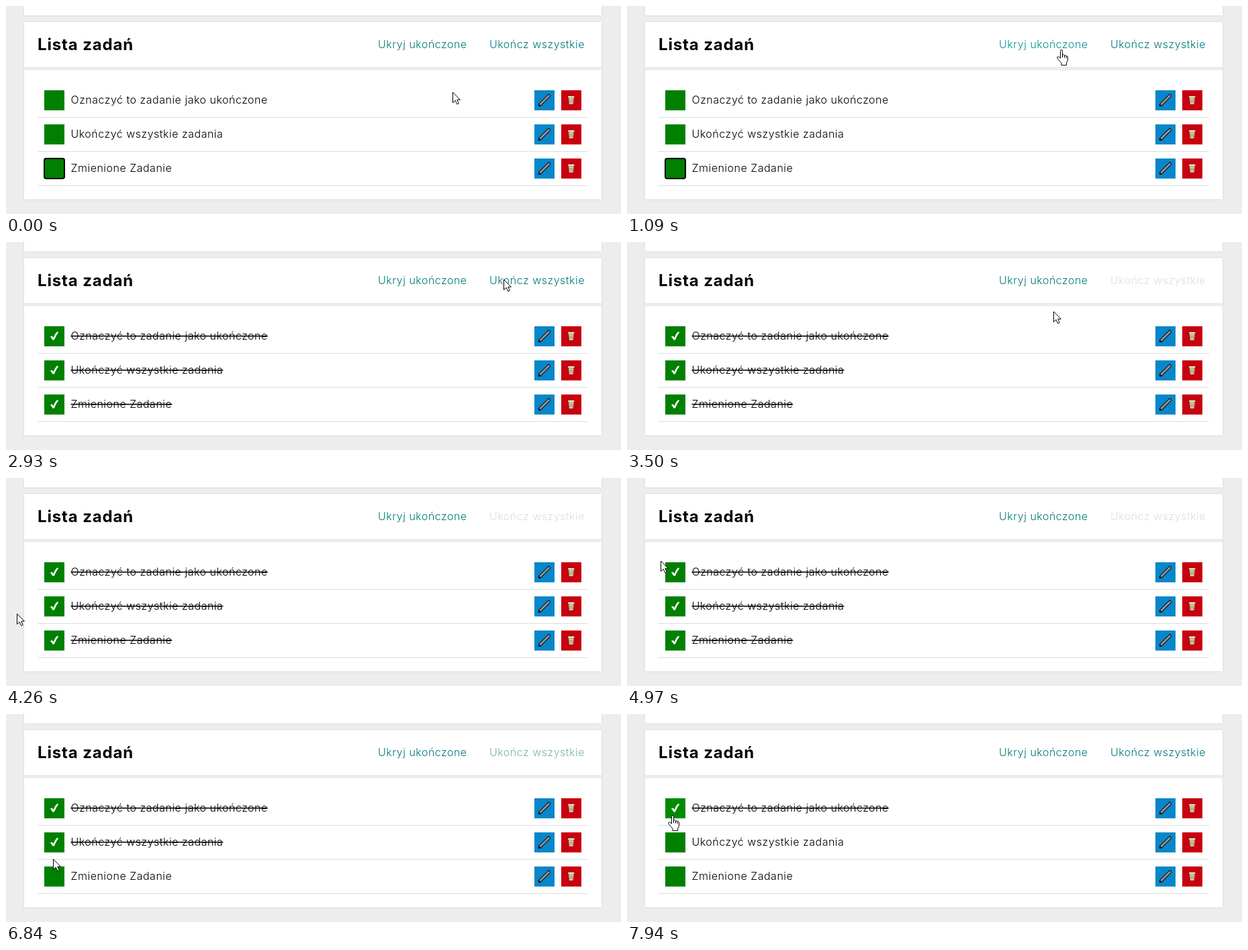
These frames come from a looping animation (916x311 px, 8000 ms). An HTML page:

```html
<!DOCTYPE html>
<html lang="pl">
<head>
<meta charset="utf-8">
<title>Lista zadań</title>
<style>
html, body { margin: 0; width: 100%; height: 100%; overflow: hidden; background: #ededed; }
svg { display: block; }
text { font: 300 16px Inter, "Open Sans", sans-serif; letter-spacing: .5px; fill: #000; white-space: pre; }
.title { font-size: 24px; font-weight: 700; letter-spacing: .85px; }
.card { fill: #fff; filter: drop-shadow(0 0 1.5px rgba(0, 0, 0, .1)); }
.done { text-decoration: line-through; }
</style>
</head>
<body>
<svg width="916" height="311" viewBox="0 0 916 311">
  <defs>
    <g id="pen" fill="none" stroke-linecap="round">
      <path d="M8.3 21.5L21.5 8.2" stroke="#111" stroke-width="5"/>
      <path d="M6.8 23.2L9 21" stroke="#111" stroke-width="2"/>
      <path d="M9 20.8L21.5 8.2" stroke="#9a929b" stroke-width="2.8"/>
    </g>
    <g id="bin" stroke="#5c3a22">
      <path d="M10 8.5h9.5v3h-.9l-.8 9.5h-6.1l-.8-9.5H10z" fill="#f6ecc8" stroke-width=".6"/>
      <path d="M11 11.5h7.5M13 13v6.5M14.8 13v6.5M16.6 13v6.5" fill="none" stroke-width=".6"/>
    </g>
    <path id="tick" fill="#fff" d="M8.8 15.6L11.6 14.5 13.5 17Q16 11.2 18.7 8.3L21.3 8.8Q17.6 13.4 14.8 20.4H12.3Q11 17.6 8.8 15.6Z"/>
  </defs>
  <rect width="916" height="311" fill="#ededed"/>
  <rect class="card" x="27" y="-10" width="860" height="24"/>
  <rect class="card" x="27" y="24" width="860" height="265"/>
  <rect x="27" y="91" width="860" height="5" fill="#ededed"/>
  <text class="title" x="47" y="66">Lista zadań</text>
  <text id="hide" x="554" y="63">Ukryj ukończone</text>
  <text id="all" x="720" y="63">Ukończ wszystkie</text>
  <g id="list"></g>
  <rect id="ring" x="57" y="228" width="30" height="30" rx="3" fill="none" stroke="#000" stroke-width="2"/>
  <path id="arrow" fill="#fff" stroke="#000" d="M.5 1V16.6L4.2 13.2 6.7 18.8 9.2 17.7 6.8 12.2H11.4Z"/>
  <g id="hand" stroke="#000" stroke-linejoin="round">
    <path fill="#fff" d="M5.5 13V2.5q0-2 1.5-2t1.5 2V8q2.5-.8 3 .8 2-.6 2.7.9 2.3-.3 2.3 1.8V15q0 3-2 5v3.5H7V20.5Q5 18 1.2 13.5q-1.2-2 .4-2.7 1.4-.4 2.4.9Z"/>
    <path fill="none" d="M8.5 8v4M11.5 9v3.5M14.2 10v3"/>
  </g>
</svg>
<script>
const LOOP = 8000, STEP = 70, PRESS = 200;
const ALL_DONE = 2930, FIRST_UNDO = 6700, SECOND_UNDO = 7670;
const BOX = 30, ROW = 51, TOP = 126;
const $ = id => document.getElementById(id);

const tasks = [
  { label: "Oznaczyć to zadanie jako ukończone", undo: Infinity },
  { label: "Ukończyć wszystkie zadania", undo: SECOND_UNDO },
  { label: "Zmienione Zadanie", undo: FIRST_UNDO }
];

// Pointer strokes: start, end, then points passed at an even pace.
const strokes = [
  [0, 0, [665, 128]],
  [410, 830, [646, 68]],
  [1020, 1160, [646, 61]],
  [1640, 2200, [698, 59], [749, 51]],
  [2860, 3500, [635, 103]],
  [3500, 4970, [330, 215], [90, 264], [18, 190], [158, 108], [104, 93], [50, 123]],
  [4970, 5810, [78, 226], [74, 190]],
  [6090, 6160, [74, 202]],
  [6160, 6370, [72, 240]],
  [FIRST_UNDO, 6910, [69, 206]],
  [6910, 7260, [70, 190]],
  [7600, 7940, [66, 145]]
];

// Catmull-Rom curve through a, b, c, d between b and c.
function curve(a, b, c, d, k) {
  return b + k / 2 * (c - a + k * (2 * a - 5 * b + 4 * c - d + k * (3 * (b - c) + d - a)));
}

function pointerAt(t) {
  const i = strokes.findLastIndex(s => s[0] <= t);
  const [start, end, ...stops] = strokes[i];
  if (t >= end) return stops.at(-1);
  const pts = [strokes[i - 1].at(-1), ...stops];
  const u = (t - start) / (end - start) * stops.length, n = Math.floor(u);
  const at = j => pts[Math.max(0, Math.min(pts.length - 1, j))];
  return [0, 1].map(c =>
    Math.round(curve(at(n - 1)[c], at(n)[c], at(n + 1)[c], at(n + 2)[c], u - n)));
}

// The screen refreshes every STEP, counted anew from each stroke or click.
const marks = [...strokes.map(s => s[0]), ALL_DONE - PRESS, ALL_DONE, SECOND_UNDO - PRESS, SECOND_UNDO];

function refreshTime(t) {
  const last = Math.max(...marks.filter(m => m <= t));
  return last + Math.floor((t - last) / STEP) * STEP;
}

const inside = ([x, y], l, t, r, b) => x >= l && x <= r && y >= t && y <= b;
const show = (el, on) => el.setAttribute("visibility", on ? "visible" : "hidden");
const place = (el, x, y) => el.setAttribute("transform", `translate(${x} ${y})`);
const smooth = k => { k = Math.max(0, Math.min(1, k)); return k * k * (3 - 2 * k); };

function linkColour(hover, off) {
  const mix = a => Math.round(a + (222 - a) * off);
  const tone = hover ? 148 : 120;
  return `rgb(${mix(0)},${mix(tone)},${mix(tone + 5)})`;
}

$("list").innerHTML = tasks.map(({ label }, i) => `
  <g transform="translate(0 ${TOP + i * ROW})">
    <g class="box"><rect x="57" width="${BOX}" height="${BOX}"/><use href="#tick" x="57"/></g>
    <text x="96.5" y="20">${label}</text>
    <rect x="787" width="${BOX}" height="${BOX}" fill="#0787c9"/><use href="#pen" x="787"/>
    <rect x="827" width="${BOX}" height="${BOX}" fill="#c8000f"/><use href="#bin" x="827"/>
    <rect x="47" y="40" width="820" height="1" fill="#ddd"/>
  </g>`).join("");
const rows = [...$("list").children];

function drawTask(row, i, t, p) {
  const { undo } = tasks[i], y = TOP + i * ROW;
  const hover = inside(p, 57, y, 57 + BOX, y + BOX);
  const done = t >= ALL_DONE && t < undo;
  const pressed = done && t >= undo - PRESS;
  const box = row.querySelector(".box");
  box.firstElementChild.setAttribute("fill", pressed ? "#009900" : hover ? "#008c00" : "#008000");
  box.setAttribute("transform", pressed ? "translate(72 15) scale(1.1) translate(-72 -15)" : "");
  show(box.lastElementChild, done);
  row.querySelector("text").setAttribute("class", done ? "done" : "");
  return hover;
}

function draw(time) {
  const t = refreshTime(time % LOOP), p = pointerAt(t);
  const enabled = t < ALL_DONE || t >= FIRST_UNDO;
  const overHide = inside(p, 555, 46, 689, 69);
  const overAll = enabled && inside(p, 721, 46, 861, 69);
  const overBox = rows.map((row, i) => drawTask(row, i, t, p)).includes(true);

  const off = smooth((t - ALL_DONE) / 450) - smooth((t - FIRST_UNDO) / 300);
  $("hide").style.fill = linkColour(overHide, 0);
  $("all").style.fill = linkColour(overAll, off);
  show($("ring"), t < ALL_DONE - PRESS);

  const active = overHide || overAll || overBox;
  show($("arrow"), !active);
  show($("hand"), active);
  place($("arrow"), ...p);
  place($("hand"), p[0] - 6, p[1]);
}

const begin = performance.now();
function tick() {
  draw(performance.now() - begin);
  requestAnimationFrame(tick);
}
tick();
</script>
</body>
</html>
```
